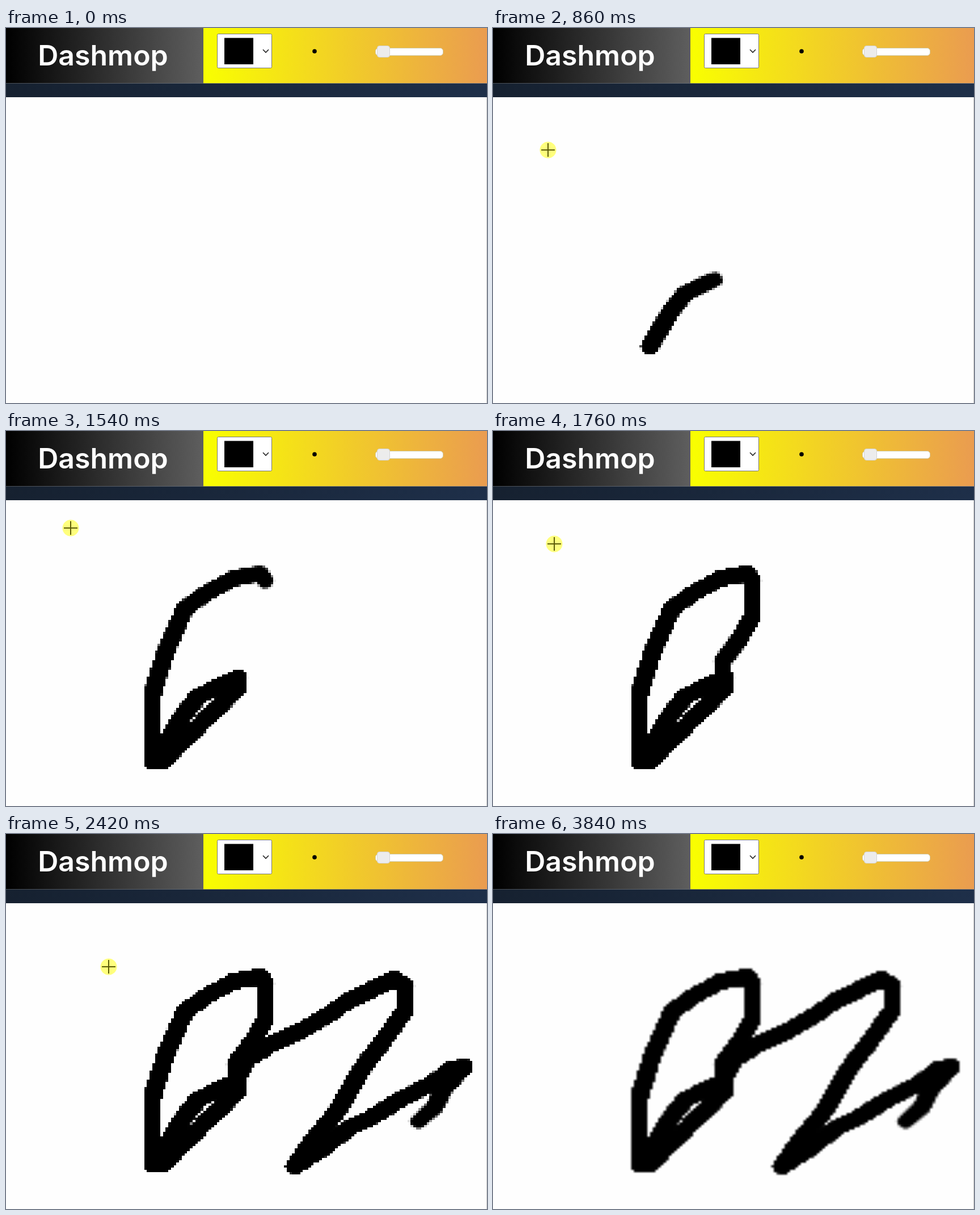
These frames come from a looping animation (848x661 px, 4.06 s). An HTML page with a canvas:

```html
<!DOCTYPE html>
<html lang="en">
<head>
<meta charset="utf-8">
<title>Dashmop</title>
<style>
html, body { margin: 0; width: 100%; height: 100%; overflow: hidden; background: #fefefe; }
canvas { display: block; }
</style>
</head>
<body>
<canvas id="stage" width="848" height="661"></canvas>
<script>
const LOOP = 4060;
const BEAT = 110;        // the picture refreshes once per beat
const SMOOTH_AT = 3840;  // the enlarged bitmap turns smooth
const POINTER_OUT = 24;  // beat at which the pointer leaves
const LEAD = 0.3;        // beats the pointer runs ahead of the ink
const SPLIT = 4;         // ink samples per path segment

const ctx = document.getElementById('stage').getContext('2d');

// The pad is a coarse bitmap enlarged to the stage.
const CELL_W = 4.744, CELL_H = 4.175, PAD_X = 1.6, PAD_Y = 124.3;
const pad = document.createElement('canvas');
pad.width = 180;
pad.height = 130;
const ink = pad.getContext('2d');

// Each stroke continues the one before and ends at the given beat.
const START_BEAT = 3, START = [277, 562];
const strokes = [
  { end: 9.25, to: [[315, 500], [338, 469], [362, 455], [391, 443], [409, 436]] },
  { end: 10, to: [[409, 453], [279, 581], [258, 580]] },
  { end: 14, to: [[258, 464], [270, 418], [282, 390], [316, 314], [347, 288], [400, 258], [447, 252], [457, 264]] },
  { end: 16, to: [[457, 325], [433, 370], [407, 406], [407, 437]] },
  { end: 18, to: [[425, 398], [470, 368], [520, 347], [575, 316], [605, 292], [683, 256], [702, 268], [702, 312], [665, 363]] },
  { end: 19.7, to: [[632, 405], [578, 492], [540, 545], [511, 585]] },
  { end: 21.3, to: [[560, 553], [605, 518], [645, 500], [695, 468], [750, 440], [785, 416], [806, 411]] },
  { end: 22, to: [[772, 450], [757, 482], [727, 507]] }
];

const mix = (a, b, f) => a + (b - a) * f;

function snap([x, y]) {
  return [
    Math.round((x - PAD_X) / CELL_W),
    Math.floor((y - PAD_Y) / CELL_H) + 0.5
  ];
}

function sampleStrokes() {
  let from = snap(START), begin = START_BEAT;
  const samples = [{ beat: begin, x: from[0], y: from[1] }];
  for (const { end, to } of strokes) {
    const count = to.length * SPLIT;
    to.map(snap).forEach((next, seg) => {
      for (let i = 1; i <= SPLIT; i++) {
        samples.push({
          beat: mix(begin, end, (seg * SPLIT + i) / count),
          x: mix(from[0], next[0], i / SPLIT),
          y: mix(from[1], next[1], i / SPLIT)
        });
      }
      from = next;
    });
    begin = end;
  }
  return samples;
}
const samples = sampleStrokes();

function fillBar(x, y, w, h, from, to) {
  const g = ctx.createLinearGradient(x, 0, x + w, 0);
  g.addColorStop(0, from);
  g.addColorStop(1, to);
  ctx.fillStyle = g;
  ctx.fillRect(x, y, w, h);
}

function box(x, y, w, h, r, fill, line) {
  ctx.beginPath();
  ctx.roundRect(x, y, w, h, r);
  ctx.fillStyle = fill;
  ctx.fill();
  ctx.strokeStyle = line;
  ctx.lineWidth = 1;
  ctx.stroke();
}

function disc(x, y, r, fill) {
  ctx.beginPath();
  ctx.arc(x, y, r, 0, Math.PI * 2);
  ctx.fillStyle = fill;
  ctx.fill();
}

function drawHeader() {
  fillBar(0, 0, 348, 97.5, '#000', '#5e5e5e');
  fillBar(348, 0, 500, 97.5, '#f9ff00', '#ea9c50');
  fillBar(0, 97.5, 848, 24.5, '#162130', '#1e2f49');

  ctx.fillStyle = '#fff';
  ctx.font = '600 50px Inter, sans-serif';
  ctx.textAlign = 'center';
  ctx.fillText('Dashmop', 171, 66);

  box(372.5, 10.5, 96, 60, 2, '#fff', '#767676');
  ctx.fillStyle = '#000';
  ctx.fillRect(385, 17.5, 51, 46.5);
  ctx.beginPath();
  ctx.moveTo(453, 38);
  ctx.lineTo(458, 43);
  ctx.lineTo(463, 38);
  ctx.strokeStyle = '#222';
  ctx.lineWidth = 1.6;
  ctx.stroke();

  disc(544, 41, 3.8, '#000');
  box(651.5, 35.5, 119, 13, 5, '#fff', '#d0cba8');
  box(654.5, 31.5, 22, 20, 4, '#ececec', '#d3d3d3');
}

// Restroking the whole path at each sample hardens the older edges.
function drawInk(beat) {
  ink.clearRect(0, 0, pad.width, pad.height);
  ink.lineWidth = 6;
  ink.lineCap = ink.lineJoin = 'round';
  ink.beginPath();
  ink.moveTo(samples[0].x, samples[0].y);
  for (const s of samples) {
    if (s.beat > beat + 0.001) break;
    ink.lineTo(s.x, s.y);
    ink.stroke();
  }
}

function drawPointer(beat) {
  const s = samples.findLast(p => p.beat <= beat + LEAD) || samples[0];
  const x = Math.round((PAD_X + s.x * CELL_W) * 0.249);
  const y = Math.round((PAD_Y + s.y * CELL_H) * 0.3 + 82);
  disc(x, y, 14.5, '#ffff7d');
  ctx.fillStyle = '#5c5c08';
  ctx.fillRect(x - 12, y - 1, 24, 2);
  ctx.fillRect(x - 1, y - 12, 2, 24);
}

let inkBeat = -1;
function draw(t) {
  const beat = Math.floor((t + 20) / BEAT);
  ctx.fillStyle = '#fefefe';
  ctx.fillRect(0, 0, 848, 661);
  ctx.fillStyle = '#c8c8c8';
  ctx.fillRect(847, 122, 1, 539);
  drawHeader();

  if (beat !== inkBeat) drawInk(inkBeat = beat);
  ctx.imageSmoothingEnabled = t >= SMOOTH_AT;
  ctx.drawImage(pad, PAD_X, PAD_Y, pad.width * CELL_W, pad.height * CELL_H);
  if (beat > 0 && beat < POINTER_OUT) drawPointer(beat);
}

const start = performance.now();
function tick() {
  draw((performance.now() - start) % LOOP);
  requestAnimationFrame(tick);
}
tick();
</script>
</body>
</html>
```
